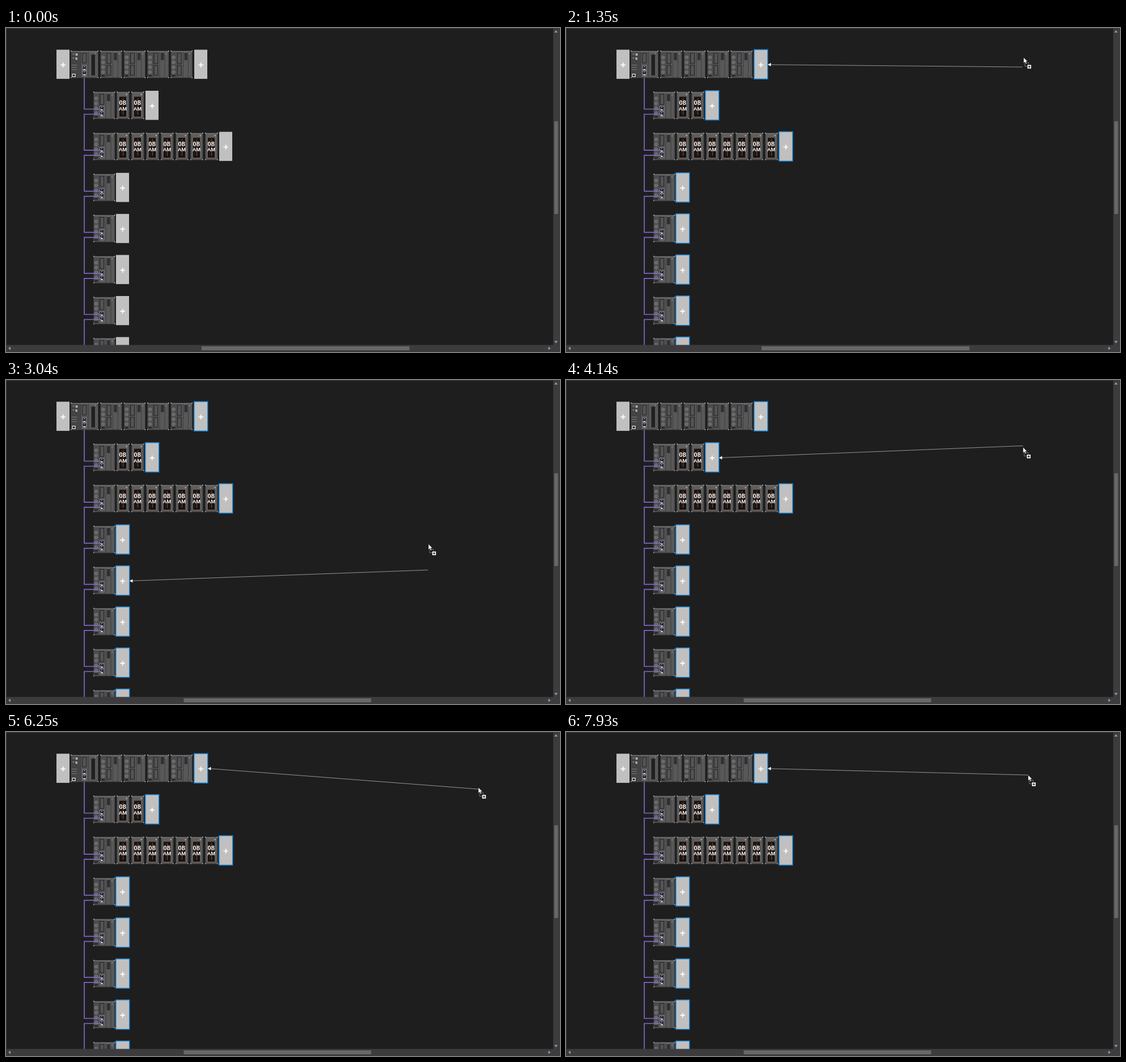
Recreate the animation shown at these times as an HTML page. Size 977x573 px, loop 8000 ms.

```html
<!DOCTYPE html>
<html lang="en">
<head>
<meta charset="utf-8">
<title>Rack drop targets</title>
<style>
html, body { margin: 0; width: 100%; height: 100%; overflow: hidden; background: #1e1e1e; }
svg { display: block; width: 100vw; height: 100vh; }
text { font-family: "Liberation Sans", Arial, sans-serif; font-weight: bold; fill: #fff; }
</style>
</head>
<body>
<svg id="stage" viewBox="0 0 977 573" preserveAspectRatio="none"></svg>
<script>
const LOOP = 8000, START = 500, STEP = 77, LAG = 70, SCROLL_AT = 1740;
const PITCH = 72.6, TOP = 38.4;
const stage = document.getElementById('stage');

function add(parent, tag, attrs, text) {
  const el = document.createElementNS('http://www.w3.org/2000/svg', tag);
  for (const k in attrs) el.setAttribute(k, attrs[k]);
  if (text) el.textContent = text;
  parent.appendChild(el);
  return el;
}
const rect = (p, x, y, width, height, fill, more) => add(p, 'rect', { x, y, width, height, fill, ...more });
const path = (p, d, more) => add(p, 'path', { d, fill: 'none', ...more });
const dot = (p, cx, cy, r, fill, more) => add(p, 'circle', { cx, cy, r, fill, ...more });
const group = (p, x = 0, y = 0) => add(p, 'g', { transform: `translate(${x} ${y})` });
const rowY = i => TOP + PITCH * i;

function body(g, w) {
  rect(g, 0.5, 0.5, w - 1, 47.6, '#585858', { stroke: '#353535' });
  rect(g, 1, 1, w - 2, 1.5, '#777');
  for (const x of [0, w - 1.5])
    for (const y of [0, 47]) rect(g, x, y, 1.5, 1.3, '#ddd');
}

function display(g, x, y, h) {
  rect(g, x, y, 7, h, '#454a4e', { stroke: '#252525' });
  rect(g, x + 1.5, y + 1.5, 4, h - 3, '#50565a');
}

function port(g, x, y) {
  rect(g, x, y, 6.5, 8.6, '#101018', { stroke: '#aaa', 'stroke-width': 0.7 });
  rect(g, x + 1.2, y + 5.2, 4, 2.4, '#d0d0d6');
  rect(g, x + 2.3, y + 1.2, 1.8, 1.6, '#b8b8c4');
}

function vents(g, x, y, n) {
  for (let i = 0; i < n; i++) rect(g, x, y + i * 2.1, 5.5, 1.4, '#1c1c1c');
}

function unit(parent, x, y, hasPorts) {
  const g = group(parent, x, y);
  body(g, 38.4);
  rect(g, 1, 2.5, 8.5, 45, '#4c4c4c');
  for (let i = 0; i < 4; i++)
    dot(g, 5, 12 + i * 8.7, 2.8, '#666', { stroke: '#858585', 'stroke-width': 0.7 });
  rect(g, 2, 43, 6, 2.5, '#252525');
  display(g, 11.8, 4, 19);
  if (hasPorts) {
    port(g, 11.8, 26);
    port(g, 11.8, 35.4);
  } else display(g, 11.8, 26, 18);
  for (const sx of [10, 21.5, 30.5]) rect(g, sx, 2, 0.9, 45, '#3c3c3c');
  vents(g, 24, 4.5, 6);
  dot(g, 33, 5.5, 1.2, '#888');
}

function card(parent, x, y) {
  const g = group(parent, x, y);
  body(g, 22.6);
  rect(g, 2.5, 3, 17.5, 42.5, '#5e5c5c');
  rect(g, 5, 9, 12, 35, '#14110f');
  rect(g, 8, 11, 0.8, 30, '#4a2c1c');
  rect(g, 11, 11, 1.2, 30, '#8f4522');
  dot(g, 17.7, 5, 1.3, '#aaa');
  add(g, 'text', { x: 10.7, y: 23.6, 'font-size': 11, 'text-anchor': 'middle' }, '08');
  add(g, 'text', { x: 10.9, y: 33, 'font-size': 9.3, 'text-anchor': 'middle' }, 'AM');
}

function controller(parent, x, y) {
  const g = group(parent, x, y);
  body(g, 49);
  rect(g, 1, 2.5, 18, 45, '#444');
  add(g, 'text', { x: 8.6, y: 8.6, 'font-size': 6 }, 'R');
  add(g, 'text', { x: 8.6, y: 16, 'font-size': 6 }, 'E');
  for (const cy of [6, 13]) dot(g, 5, cy, 1.5, '#777');
  for (let i = 0; i < 3; i++) rect(g, 2, 25 + i * 4, 9, 0.8, '#858585');
  rect(g, 3, 41.5, 5, 4.5, '#222', { stroke: '#eee', 'stroke-width': 1.2 });
  display(g, 20.8, 4, 18);
  port(g, 21.2, 27);
  port(g, 21.2, 36);
  rect(g, 30.5, 2, 1, 45, '#353535');
  rect(g, 36.5, 7, 6.5, 37, '#292929');
  vents(g, 37, 8, 17);
  dot(g, 43.5, 4.5, 1, '#999');
}

const outlines = group(stage);
function slot(x, y, target) {
  rect(stage, x, y, 23, 51.5, '#c0c0c0');
  path(stage, `M${x + 7.5} ${y + 26.9}h8.4M${x + 11.7} ${y + 22.7}v8.4`, { stroke: '#fff', 'stroke-width': 1.7 });
  if (target) rect(outlines, x - 0.2, y - 0.2, 23.9, 52, 'none', { stroke: '#1584d8', 'stroke-width': 1.5 });
}

// Rack layout
rect(stage, 0, 0, 977, 573, '#1e1e1e');
const cardCount = i => [0, 2, 7][i] || 0;
const slotX = i => i ? 194 + cardCount(i) * 26 : 332;
const wire = { stroke: '#8067c5', 'stroke-width': 1.7 };

slot(89, TOP);
controller(stage, 114, TOP + 1.6);
for (let k = 0; k < 4; k++) unit(stage, 166.3 + k * 41.4, TOP + 1.6, false);
for (let i = 0; i < 8; i++) {
  const y = rowY(i);
  if (i) unit(stage, 154, y + 1.6, true);
  for (let k = 0; k < cardCount(i); k++) card(stage, 195 + k * 26, y + 1.6);
  slot(slotX(i), y, true);
}
for (let i = 0; i < 8; i++) {
  const y = rowY(i), from = i ? `M169 ${y + 41.5}H138` : `M138 ${y + 49.8}`;
  path(stage, `${from}V${y + 105.1}H169`, wire);
}
stage.appendChild(outlines);

// Window edge and scrollbars
path(stage, 'M0 .5H965M.5 0V560', { stroke: '#414145' });
rect(stage, 965, 0, 12, 573, '#3c3c3e');
rect(stage, 0, 560.5, 977, 12.5, '#3c3c3e');
rect(stage, 967, 165, 6.5, 164, '#686868');
const thumb = rect(stage, 345, 563, 366.5, 7, '#686868');
path(stage, 'M967 8l3-4 3 4zM967 553.5l3 4 3-4zM8 563.5l-4 3 4 3zM956.5 563.5l4 3-4 3z', { fill: '#999' });

// Drag link and pointer
const drag = group(stage);
const link = path(drag, '', { stroke: '#a2a2a2', 'stroke-width': 0.9 });
const head = path(drag, '', { fill: '#fff' });
const pointer = group(drag);
path(pointer, 'M2 10.5V15.5H7M6 9.5H9V13', { stroke: '#bbb', 'stroke-dasharray': '1 1' });
path(pointer, 'M0 0V10.3L2.3 8.2 4 11.8 5.7 11 4.1 7.6H7.3Z', { fill: '#fff', stroke: '#111', 'stroke-width': 0.6 });
rect(pointer, 6.5, 13, 7, 7, '#fff', { stroke: '#111', 'stroke-width': 0.5 });
path(pointer, 'M8 16.5h4M10 14.5v4', { stroke: '#111', 'stroke-width': 1.2 });

// Key points of the pointer's path: time, x, y
const keys = [
  [500, 936, 118], [1277, 805, 69], [1347, 807, 52], [1500, 809, 41],
  [2201, 758, 264], [2271, 746, 283], [2800, 741, 460], [2971, 744, 336], [3041, 745, 290],
  [3540, 806, 76], [4140, 806, 119], [4370, 806, 119], [4780, 845, 138], [5300, 836, 133],
  [5700, 834, 146], [6205, 833, 101], [6275, 833, 98], [6640, 842, 80], [7470, 816, 77], [7930, 815, 76]
];

const slope = (i, axis) => (keys[i + 1][axis] - keys[i][axis]) / (keys[i + 1][0] - keys[i][0]);

// Harmonic mean of both sides keeps the curve from overshooting a key point.
function tangent(i, axis) {
  if (i === 0 || i === keys.length - 1) return 0;
  const a = slope(i - 1, axis), b = slope(i, axis);
  return a * b > 0 ? 2 * a * b / (a + b) : 0;
}

function pointAt(time) {
  const t = Math.max(keys[0][0], Math.min(keys[keys.length - 1][0], time));
  const i = Math.max(1, keys.findIndex(k => k[0] >= t)) - 1;
  const span = keys[i + 1][0] - keys[i][0], u = (t - keys[i][0]) / span, v = 1 - u;
  return [1, 2].map(axis =>
    keys[i][axis] * v * v * (1 + 2 * u) + keys[i + 1][axis] * u * u * (1 + 2 * v) +
    span * u * v * (tangent(i, axis) * v - tangent(i + 1, axis) * u));
}

function render(t) {
  const active = t >= START, early = t < SCROLL_AT;
  outlines.style.display = drag.style.display = active ? '' : 'none';
  thumb.setAttribute('x', early ? 345 : 313.5);
  thumb.setAttribute('width', early ? 366.5 : 330.5);
  if (!active) return;

  // The link trails the pointer and snaps to the nearest row.
  const now = START + STEP * Math.floor((t - START) / STEP + 0.4);
  const [px, py] = pointAt(now), [lx, ly] = pointAt(now - LAG);
  const row = Math.max(0, Math.round((ly - 65) / PITCH));
  const x = slotX(row) + 23.8, y = rowY(row) + 26.4;
  pointer.setAttribute('transform', `translate(${px} ${py})`);
  link.setAttribute('d', `M${x + 5} ${y}L${lx} ${ly}`);
  head.setAttribute('d', `M${x} ${y}l5.5 -3v6z`);
}

function tick() {
  render(performance.now() % LOOP);
  requestAnimationFrame(tick);
}
tick();
</script>
</body>
</html>
```
